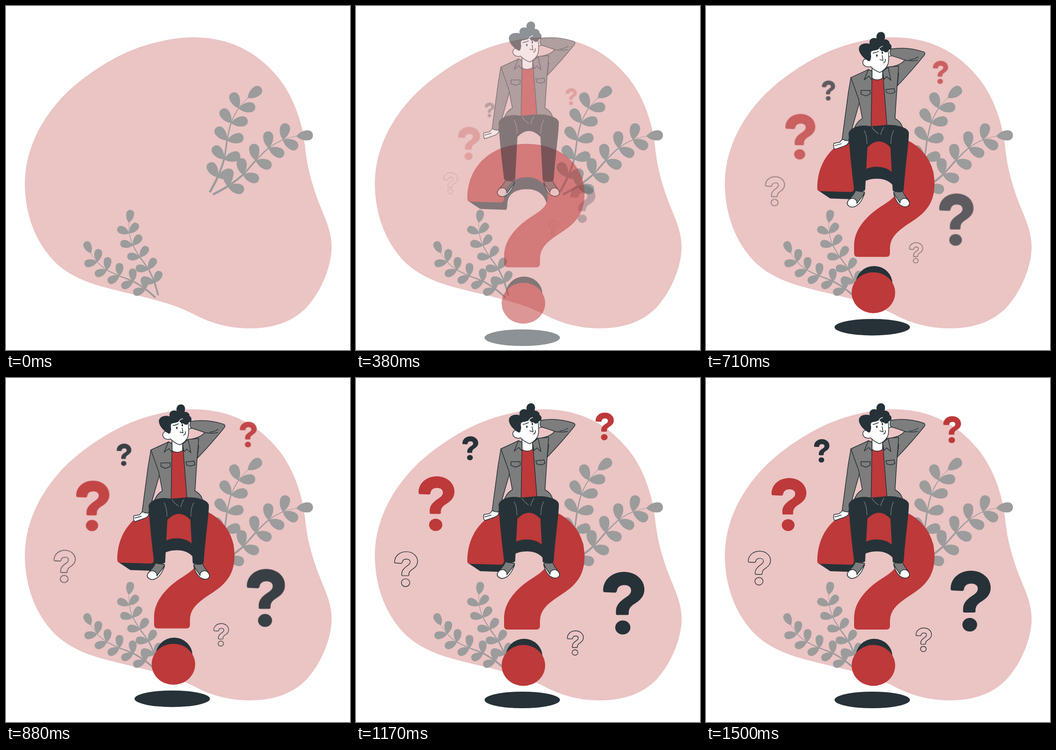
An HTML page that plays this animation: 748x748 px, repeating every 1540 ms.

```html
<!DOCTYPE html>
<html lang="en">
<head>
<meta charset="utf-8">
<title>Thinking it over</title>
<style>
  html, body { margin: 0; width: 100%; height: 100%; overflow: hidden; background: #fff; }
  svg { display: block; width: 100vw; height: 100vh; }
  .red { fill: #be3939; }
  .dark { fill: #263238; }
  .ink { stroke: #263238; stroke-width: 1.5; stroke-linecap: round; stroke-linejoin: round; }
  .coat { fill: #7d7d7d; }
  .skin { fill: #fff; }
  .line { fill: none; stroke-linecap: round; }
</style>
</head>
<body>
<svg viewBox="0 0 748 748">
  <defs>
    <g id="sprig" fill="#9c9c9c" stroke="#9c9c9c"></g>
    <g id="mark">
      <path d="M0 39C0 16 20 0 44 0C68 0 87 16 87 37C87 52 78 60 67 67C57 73 54 79 54 86V88Q54 91 51 91H30Q27 91 27 88V83C27 70 36 62 46 55C54 50 59 46 59 39C59 32 53 28 45 28C35 28 30 33 29 40Q28 44 25 44L3 43Q0 43 0 39Z"/>
      <ellipse cx="41.5" cy="117.5" rx="16" ry="14.8"/>
    </g>
  </defs>

  <path fill="#ebc4c4" d="M407 68C500 68 557 112 594 158C630 204 645 262 650 303C655 352 664 382 677 419C692 459 708 486 708 525C708 560 690 615 654 655C620 690 575 701 530 701C480 701 440 687 410 671C375 653 345 645 327 640C290 629 250 622 205 609C155 595 115 572 90 538C60 500 41 445 41 387C41 320 70 256 118 203C150 168 195 135 245 109C290 86 355 68 407 68Z"/>
  <use href="#sprig" transform="translate(443 405) rotate(-33)"/>
  <use href="#sprig" transform="translate(450 410)"/>
  <use href="#sprig" transform="translate(331 629) rotate(-77) scale(.77)"/>
  <use href="#sprig" transform="translate(325 634) rotate(-110.5) scale(.77)"/>
  <g id="marks"></g>

  <ellipse class="dark" data-from="45" cx="361.5" cy="700" rx="82" ry="18"/>

  <g data-from="45">
    <path class="dark" d="M243 402L270 420L326 422Q329 420 329 409C330 389 345 377 372 377C395 377 411 389 415 411L430 320H300Z"/>
    <path class="red" d="M242 398C242 323 298 278.5 371 278.5C443 278.5 497 322 497 387C497 430 478 451 445 472C412 493 400 507 400 530V539Q400 547 392 547H330Q322 547 322 539V522C322 490 345 462 375 441C400 425 417 415 417 394C417 367 398 351 371 351C343 351 323 370 322 396Q322 406 314 406L248 404Q242 404 242 398Z"/>
    <ellipse class="dark" cx="365.5" cy="606" rx="40" ry="39"/>
    <ellipse class="red" cx="364" cy="625" rx="47.3" ry="44.5"/>
  </g>

  <g data-from="-45">
    <!-- shoes -->
    <g class="ink">
      <path class="coat" d="M325 400L345 403C338 418 332 431 322 435C312 438 305 430 308 424C313 415 320 412 325 400Z"/>
      <path class="skin" d="M308 424Q312 415 321 417Q329 420 328 428L345 406C340 420 333 432 322 435C312 438 305 430 308 424Z"/>
      <path class="coat" d="M408 403L427 399C430 411 438 415 442 425C444 432 436 437 428 434C418 430 413 416 408 403Z"/>
      <path class="skin" d="M442 425Q438 415 429 417Q421 420 422 427L408 406C412 420 418 431 428 434C437 437 444 432 442 425Z"/>
    </g>
    <!-- raised arm and hand -->
    <path class="skin ink" d="M390 93L397 92L403 91V107L394 109Z"/>
    <path class="coat ink" d="M402 92C420 89 446 89 473 98Q478 100 475 105Q446 141 415 173L392 132C412 130 425 125 432 116C424 113 412 109 402 106Q398 99 402 92Z"/>
    <path class="line ink" d="M432 116C442 118 452 118 460 116M443 115Q452 115 461 109"/>
    <!-- resting arm and hand -->
    <path class="skin ink" d="M297 288L311 291C310 299 306 301 300 303L280 310Q276 306 278 297L290 295Z"/>
    <path class="line ink" d="M280 302L294 298"/>
    <path class="coat ink" d="M315 154L309 190L296 288Q303 292 310 291L334 207L332 180Z"/>
    <!-- shirt and jacket -->
    <path class="red" d="M358 145H388L397 262H355Z"/>
    <path class="coat ink" d="M352 137L315 154L332 201L340 243Q327 250 322 266H359L361 139Z"/>
    <path class="coat ink" d="M384 138L396 131L419 129Q414 190 411 243Q426 251 428 266H394Z"/>
    <path class="skin ink" d="M361 132V155Q372 163 384 155V132Z"/>
    <path class="coat ink" d="M353 136L344 159L354 151L361 159V140ZM384 141L387 158L393 152L402 160L396 131Z"/>
    <path class="line ink" d="M337 182H357V190L347 194L337 190ZM391 180L409 178L411 186L402 189L393 187ZM419 144L416 172"/>
    <!-- trousers -->
    <path class="dark" d="M310 275C314 262 335 255 359 260L393 257C415 256 438 262 441 273C442 290 434 340 430 397L428 402C420 405 412 403 406 400L401 306Q376 280 351 306L346 399Q335 406 322 398C316 350 312 310 310 275Z"/>
    <path class="line" stroke="#7d7d7d" stroke-width="1.3" d="M344 269Q350 280 350 298M361 262Q366 270 375 276M387 262Q382 268 380 278M408 269Q402 280 402 298"/>
    <!-- head -->
    <path class="skin ink" d="M357 116C350 110 341 114 341 121C341 128 349 133 358 130Q366 139 378 143Q392 136 396 124Q399 110 395 90L365 86Q355 98 357 116Z"/>
    <path class="dark" d="M355 119C340 112 330 97 333 88C336 80 348 78 356 81C353 72 362 65 371 69C369 60 375 54 382 55C389 56 391 64 388 71C395 70 400 76 399 80C405 83 405 92 398 94C394 101 389 100 387 97C382 96 379 94 377 92C368 96 360 95 357 99C360 106 360 113 355 119Z"/>
    <path class="line" stroke="#fff" stroke-width="1.4" d="M375 94Q378 87 384 86"/>
    <path class="line ink" d="M363 101Q369 100 375 97M381 96L386 95M378 115L385 117L383 106M386 122Q391 120 390 114"/>
    <ellipse class="dark" cx="371.5" cy="106" rx="1.6" ry="2.8"/>
    <ellipse class="dark" cx="383.5" cy="100" rx="1.6" ry="2.8"/>
  </g>
</svg>

<script>
const LOOP = 1540, FRAME = 1000 / 24;
const RED = '#be3939', DARK = '#263238';
const sprig = document.getElementById('sprig');
const marks = document.getElementById('marks');

function add(parent, tag, attrs) {
  const el = document.createElementNS('http://www.w3.org/2000/svg', tag);
  for (const k in attrs) el.setAttribute(k, attrs[k]);
  return parent.appendChild(el);
}

function leaf([x, y], angle) {
  add(sprig, 'path', {
    d: 'M0 0C.2-.22 .45-.31 .7-.3C.88-.29 1-.17 1 0C1 .17 .88 .29 .7 .3C.45 .31 .2 .22 0 0Z',
    stroke: 'none',
    transform: `translate(${x} ${y}) rotate(${angle}) scale(36.5)`
  });
}

// One sprig: a smooth tapering stem with a pair of leaves at every joint
function growSprig(stem) {
  const last = stem.length - 1;
  const slope = i => {
    const a = stem[Math.max(0, i - 1)], b = stem[Math.min(last, i + 1)];
    return [(b[0] - a[0]) / 6, (b[1] - a[1]) / 6];
  };
  for (let i = 0; i < last; i++) {
    const a = stem[i], b = stem[i + 1], da = slope(i), db = slope(i + 1);
    add(sprig, 'path', {
      d: `M${a}C${a[0] + da[0]} ${a[1] + da[1]} ${b[0] - db[0]} ${b[1] - db[1]} ${b}`,
      fill: 'none',
      'stroke-width': 5 * (1 - i / last) ** 0.9,
      'stroke-linecap': i ? 'round' : 'butt'
    });
  }
  stem.slice(1, last).forEach((joint, i) => {
    leaf(joint, 3.6 * (i - 1.7) ** 2 - 98);
    leaf(joint, 14 + 3.5 * i);
  });
  leaf(stem[last], -4);
}

growSprig([[0, 0], [32, -18], [65, -43], [93, -74], [121, -101], [152, -119], [181, -127]]);

function addMark(x, y, size, fill, stroke = 'none') {
  add(marks, 'use', {
    href: '#mark',
    transform: `translate(${x} ${y}) scale(${size})`,
    fill, stroke, 'stroke-width': 1.4 / size
  });
}

addMark(532, 419, 1, DARK);
addMark(235, 133, .384, DARK);
addMark(142.5, 217.5, .871, RED);
addMark(516, 83, .443, RED);
addMark(92, 376.5, .557, 'none', DARK);
addMark(456.5, 543.5, .389, 'none', DARK);

// cubic-bezier(.36, -.01, .5, 1.38): slow start, then an overshoot
function ease(x) {
  if (x >= 1) return 1;
  const curve = (s, a, b) => 3 * a * s * (1 - s) ** 2 + 3 * b * s * s * (1 - s) + s ** 3;
  let lo = 0, hi = 1;
  for (let i = 0; i < 24; i++) {
    const mid = (lo + hi) / 2;
    if (curve(mid, .36, .5) < x) lo = mid; else hi = mid;
  }
  return curve(lo, -.01, 1.38);
}

function show(el, progress, transform) {
  el.setAttribute('transform', transform);
  el.setAttribute('opacity', Math.max(0, Math.min(1, progress)));
}

const sliders = document.querySelectorAll('[data-from]');
const CX = 355.3, CY = 338.7;

function draw(ms) {
  // 24 steps a second, each posed at its middle
  const step = Math.floor((ms % LOOP + 5) / FRAME);
  const t = step ? (step + .5) * FRAME : 0;

  const slide = ease(t / 1000);
  for (const el of sliders) show(el, slide, `translate(0 ${el.dataset.from * (1 - slide)})`);

  const zoom = ease(t / 1500);
  show(marks, zoom, `translate(${CX} ${CY}) scale(${.5 + zoom / 2}) translate(${-CX} ${-CY})`);
}

const start = performance.now();
function tick() {
  draw(performance.now() - start);
  requestAnimationFrame(tick);
}
tick();
</script>
</body>
</html>
```
